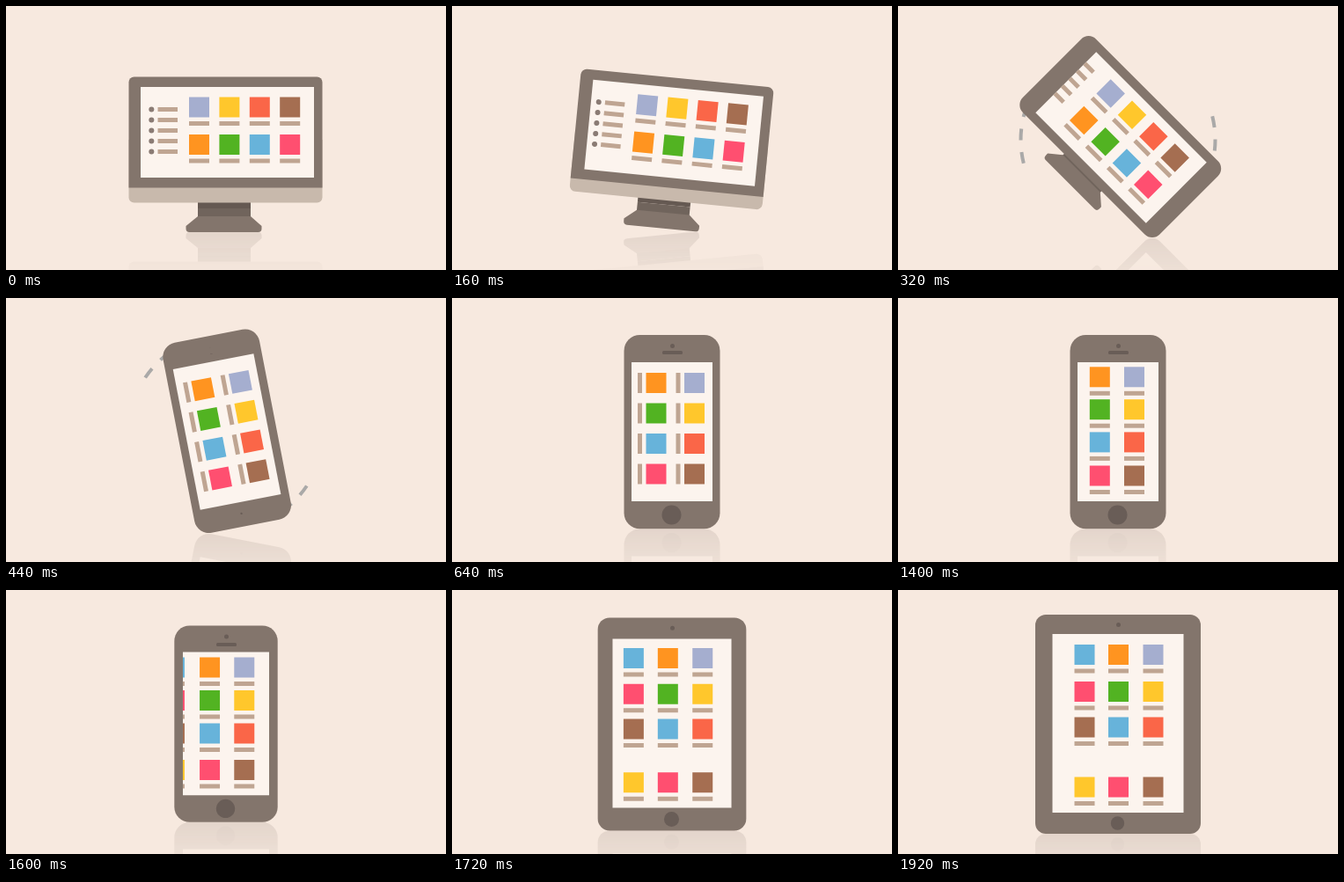
These frames come from a looping animation (500x300 px, 1960 ms). An HTML page with a canvas:

```html
<!DOCTYPE html>
<html lang="en">
<head>
<meta charset="utf-8">
<title>Responsive devices</title>
<style>
  html, body { margin: 0; width: 100%; height: 100%; overflow: hidden; background: #f7e9df; }
  canvas { display: block; width: 100vw; height: 100vh; }
</style>
</head>
<body>
<canvas id="stage" width="500" height="300"></canvas>
<script>
const W = 500, H = 300, CX = 250, CY = 152;
const LOOP = 1960, STEP = 40, TURN_END = 640;
const BG = '#f7e9df', BODY = '#83756c', CHIN = '#c8b9ac', SCREEN = '#fcf4ee';
const BAR = '#bfa592', BULLET = '#8a7b74', DETAIL = '#695d57', DASH = '#aaa9a8';
const ink = {
  purple: '#a5aecf', yellow: '#ffc72c', red: '#fa6648', brown: '#a56e51',
  orange: '#ff9420', green: '#52b322', blue: '#67b3da', pink: '#ff4f70'
};
const COLUMNS = [
  ['blue', 'pink', 'brown', 'yellow'],
  ['orange', 'green', 'blue', 'pink'],
  ['purple', 'yellow', 'red', 'brown']
];

const main = document.getElementById('stage').getContext('2d');
const mirrorCanvas = document.createElement('canvas');
mirrorCanvas.width = W;
mirrorCanvas.height = H;
const mirror = mirrorCanvas.getContext('2d');

const rad = deg => deg * Math.PI / 180;
const lerp = (a, b, p) => a + (b - a) * p;
const clamp = x => Math.min(1, Math.max(0, x));
const ramp = (t, from, to) => clamp((t - from) / (to - from));
const easeInOut = (x, n) =>
  x < 0.5 ? 2 ** (n - 1) * x ** n : 1 - 2 ** (n - 1) * (1 - x) ** n;

function box(c, x0, y0, x1, y1, color, r = 0) {
  c.fillStyle = color;
  c.beginPath();
  c.roundRect(x0, y0, x1 - x0, y1 - y0, r);
  c.fill();
}

function dot(c, x, y, r, color) {
  c.fillStyle = color;
  c.beginPath();
  c.arc(x, y, r, 0, 2 * Math.PI);
  c.fill();
}

function clipBox(c, x0, y0, x1, y1) {
  c.beginPath();
  c.rect(x0, y0, x1 - x0, y1 - y0);
  c.clip();
}

// A coloured tile with its caption bar.
function tile(c, x, y, color, deg = 0) {
  c.save();
  c.translate(x, y);
  c.rotate(rad(deg));
  box(c, -11.5, -11.5, 11.5, 11.5, ink[color]);
  box(c, -11.5, 16, 11.5, 21, BAR);
  c.restore();
}

// Camera, speaker and home button of a handheld; p goes from phone to tablet.
function details(c, size, p) {
  if (size <= 0) return;
  dot(c, 0.5, lerp(-97.5, -112.5, p), 2.5 * size, DETAIL);
  dot(c, -0.5, lerp(94.5, 113, p), lerp(11, 7.7, p) * size, DETAIL);
  const half = 11.5 * size;
  c.globalAlpha = 1 - ramp(p, 0.15, 0.6);
  box(c, 0.5 - half, -90 - 2 * size, 0.5 + half, -90 + 2 * size, DETAIL, 1.5 * size);
  c.globalAlpha = 1;
}

function stand(c, lift) {
  c.save();
  c.translate(-2.5, -lift);
  box(c, -29.5, 50, 30.5, 78, '#655952');
  box(c, -29.5, 78, 30.5, 88, '#70645c');
  c.fillStyle = BODY;
  c.beginPath();
  c.moveTo(-29.5, 87);
  c.lineTo(30.5, 87);
  c.lineTo(43, 98);
  c.arcTo(43, 105, 37, 105, 4);
  c.lineTo(-39, 105);
  c.arcTo(-43, 105, -43, 98, 4);
  c.lineTo(-43, 98);
  c.closePath();
  c.fill();
  c.restore();
}

function monitorPose(t) {
  const p = easeInOut(t / TURN_END, 3);
  return {
    p, deg: 90 * p, top: lerp(-71.5, -55, p), bottom: 54.5,
    chin: 17 * Math.max(0, 1 - 2 * p), r: lerp(6, 18, p), lift: 61 * p
  };
}

function monitorFloor(m) {
  const s = Math.sin(rad(m.deg)), k = Math.cos(rad(m.deg));
  const low = m.bottom + m.chin;
  const body = (110 - m.r) * s + (low - m.r) * k + m.r;
  const foot = 38 * s + (101 - m.lift) * k + 4;
  return CY + Math.max(body, foot);
}

function drawMonitor(c, t) {
  const m = monitorPose(t), p = m.p;
  c.save();
  c.translate(CX, CY);
  c.rotate(rad(m.deg));
  stand(c, m.lift);
  const low = m.r * ramp(p, 0.3, 0.5);
  if (m.chin > 0) box(c, -110.5, 0, 109.5, m.bottom + m.chin, CHIN, [0, 0, m.r, m.r]);
  box(c, -110.5, m.top, 109.5, m.bottom, BODY, [m.r, m.r, low, low]);

  c.save();
  const x0 = lerp(-97, -79, p), x1 = lerp(100, 79, p);
  const y0 = lerp(-60, -46, p), y1 = lerp(43, 46, p);
  box(c, x0, y0, x1, y1, SCREEN);
  clipBox(c, x0, y0, x1, y1);
  for (let i = 0; i < 5; i++) {
    const y = -34.5 + 12 * i, dx = -38 * p;
    dot(c, -84.7 + dx, y, 3, BULLET);
    box(c, -77.5 + dx, y - 2.5, -55 + dx, y + 2.5, BAR);
  }
  for (let i = 0; i < 4; i++) {
    const x = -30.5 + 34.4 * i - 25 * p;
    tile(c, x, lerp(-37, -25.5, p), ['purple', 'yellow', 'red', 'brown'][i]);
    tile(c, x, lerp(5.5, 18, p), COLUMNS[1][i]);
  }
  c.restore();

  c.rotate(rad(-90));
  details(c, ramp(t, 420, 600), 0);
  c.restore();
}

// Dashed arcs trailing behind the turning corners.
function drawTrail(c, t) {
  if (t <= 200 || t >= 600) return;
  const tail = t < 320 ? lerp(160, 120, ramp(t, 200, 320)) : lerp(120, 139, ramp(t, 320, 560));
  c.save();
  c.translate(CX, CY);
  c.rotate(rad(monitorPose(t).deg));
  c.strokeStyle = DASH;
  c.lineWidth = 4;
  for (const side of [0, 180]) {
    for (let start = 121; start < 150; start += 13.8) {
      const from = Math.max(start, tail), to = start + 6.7;
      if (from >= to) continue;
      c.beginPath();
      c.arc(0, 0, 110.5, rad(side + from), rad(side + to));
      c.stroke();
    }
  }
  c.restore();
}

const growth = t => easeInOut(ramp(t, 1380, 1980), 5);

function drawHandheld(c, t) {
  const p = growth(t);
  const half = lerp(54.5, 94, p);
  c.save();
  c.translate(CX, CY);
  box(c, -half, lerp(-110, -124, p), half, lerp(110.3, 125, p), BODY, lerp(18, 12, p));
  details(c, 1, p);
  const sx = lerp(46, 74.5, p), y0 = lerp(-79, -102, p), y1 = lerp(79, 101, p);
  box(c, -sx, y0, sx, y1, SCREEN);
  clipBox(c, -sx, y0, sx, y1);
  c.translate(-CX, -CY);

  const firstX = [189, 229.3, 268.5], lastX = [212, 250.5, 290];
  const firstY = [89.8, 126.7, 163.9, 202.1], lastY = [73.5, 115.5, 156, 224];
  COLUMNS.forEach((colors, col) => colors.forEach((color, row) => {
    let x = lerp(firstX[col], lastX[col], p);
    let y = lerp(firstY[row], lastY[row], p);
    let deg = 0;
    if (col > 0) {
      const start = 644 + 33 * (2 * row + col - 1);
      const left = 1 - easeInOut(ramp(t, start, start + 600), 5);
      x += left * ([232, 275.5][col - 1] - firstX[col]);
      y += left * (96.5 + 34.5 * row - firstY[row]);
      deg = 90 * left;
    }
    tile(c, x, y, color, deg);
  }));
  c.restore();
}

function drawReflection(draw, t, floor) {
  mirror.clearRect(0, 0, W, H);
  mirror.save();
  mirror.translate(0, 2 * floor);
  mirror.scale(1, -1);
  draw(mirror, t);
  mirror.restore();
  const fade = mirror.createLinearGradient(0, floor, 0, floor + 60);
  fade.addColorStop(0, 'rgba(0,0,0,0.17)');
  fade.addColorStop(1, 'rgba(0,0,0,0.02)');
  mirror.globalCompositeOperation = 'destination-in';
  mirror.fillStyle = fade;
  mirror.fillRect(0, 0, W, H);
  mirror.globalCompositeOperation = 'source-over';
  main.save();
  clipBox(main, 0, floor, W, H);
  main.drawImage(mirrorCanvas, 0, 0);
  main.restore();
}

function render(t) {
  const turning = t < TURN_END;
  const draw = turning ? drawMonitor : drawHandheld;
  const floor = turning ? monitorFloor(monitorPose(t)) : CY + lerp(110.3, 125, growth(t));
  main.fillStyle = BG;
  main.fillRect(0, 0, W, H);
  drawReflection(draw, t, floor);
  drawTrail(main, t);
  draw(main, t);
}

const begin = performance.now();
function tick() {
  const t = (performance.now() - begin) % LOOP;
  render(Math.floor(t / STEP) * STEP);
  requestAnimationFrame(tick);
}
tick();
</script>
</body>
</html>
```
